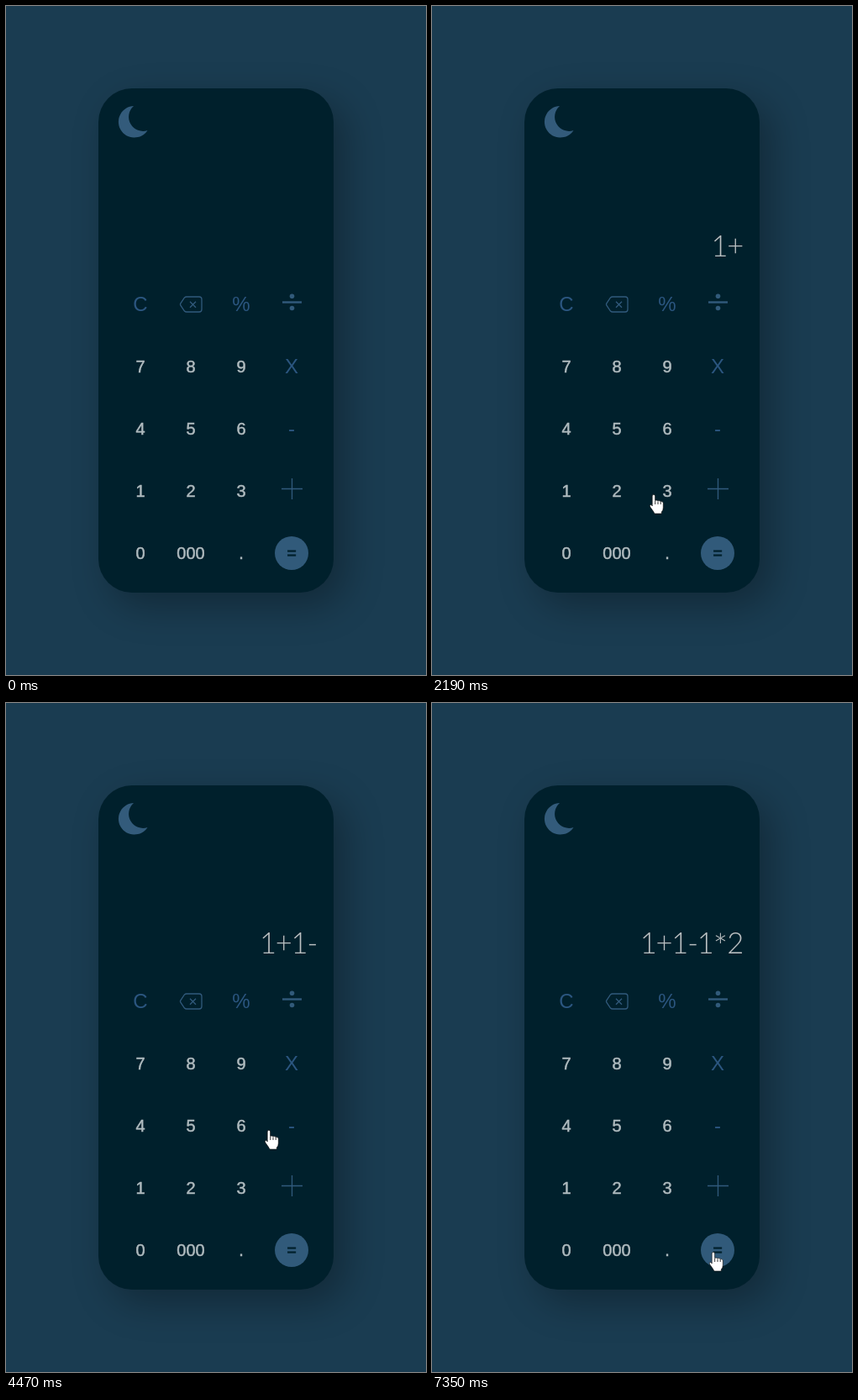
These frames come from a looping animation (500 by 796 pixels, 8000 ms). An HTML page:

```html
<!DOCTYPE html>
<html lang="en">
<head>
<meta charset="utf-8">
<title>Calculator</title>
<style>
  html, body { margin: 0; width: 100%; height: 100%; overflow: hidden; background: #1a3c51; }
  .case {
    position: absolute; left: 110px; top: 98px; width: 280px; height: 600px;
    border-radius: 40px; background: #00202c;
    box-shadow: 14px 16px 45px rgba(0, 0, 0, .3);
  }
  svg { position: absolute; left: 0; top: 0; }
  #display {
    position: absolute; left: 110px; width: 260px; top: 265px; letter-spacing: -1.2px;
    font: 300 34.5px/40px Lato, sans-serif; text-align: right; white-space: nowrap; color: #bcc0c2;
  }
  #display i { font-style: normal; font-size: 42px; line-height: 0; vertical-align: -7px; }
  text {
    font: 20px "Liberation Sans", Arial, sans-serif; text-anchor: middle;
    fill: #b0bbbf; stroke: #b0bbbf; stroke-width: .5;
  }
  .op { font-size: 24px; fill: #2b5680; stroke: none; }
  .equals { fill: #00202c; stroke: #00202c; }
  .line { fill: none; stroke: #315a7c; }
</style>
</head>
<body>
<div class="case"></div>
<div id="display"></div>
<svg width="500" height="796" viewBox="0 0 500 796">
  <path fill="#335b7b" d="M152 119A18.8 18.8 0 1 0 168.5 148A17 17 0 0 1 152 119Z"/>
  <g id="keys"></g>
  <g class="line" stroke-width="1.3">
    <path d="M215 346H230a3 3 0 0 1 3 3V361a3 3 0 0 1-3 3H215q-1.500 0-2.500-1L208 356.500q-1.200-1.500 0-3L212.500 347q1-1 2.500-1Z"/>
    <path d="M219 351.700l7 7m0-7l-7 7"/>
    <path d="M328 574.500h25M340.500 562v25"/>
    <path stroke-width="2.400" d="M329 352.500h23"/>
  </g>
  <g fill="#315a7a">
    <circle cx="340.500" cy="345.300" r="2.800"/>
    <circle cx="340.500" cy="359.500" r="2.800"/>
    <circle cx="340" cy="651" r="20"/>
  </g>
  <text class="equals" x="340" y="658">=</text>
  <g id="cursor">
    <circle id="press" cy="-.5" r="12" fill="#fff500" fill-opacity=".5"/>
    <g fill="#fff" stroke="#000" stroke-width=".6">
      <path id="arrow" d="M0 0V16L4 12.500 6.500 18.500 9 17.500 6.500 11.800H11.500Z"/>
      <g id="hand">
        <path d="M-1.800 14V2a1.700 1.700 0 0 1 3.400 0V7.500q1.700-1 3.400.3 1.800-.6 3.200.8 2-.4 3.100 1.400V16q0 3-2 5V23H1q-1.500-3-5.300-8-1.200-2 .5-2.600 1.200-.3 2 1.600Z"/>
        <path stroke-width=".8" d="M1.700 8v4M5 8.500v3.500M8.200 9v3"/>
      </g>
    </g>
  </g>
</svg>
<script>
const $ = id => document.getElementById(id);
const LOOP = 8000, ENTER = 200, PRESS_TIME = 70, ROW = 74;

// Key labels by row; "_" cells hold drawn icons.
$("keys").innerHTML = ["C _ % _", "7 8 9 X", "4 5 6 -", "1 2 3 _", "0 000 . _"].map((row, r) =>
  row.split(" ").map((label, c) => {
    const op = r === 0 || c === 3;
    return label === "_" ? "" :
      `<text x="${160 + 60 * c}" y="${(op ? 363 : 362) + ROW * r}" class="${op ? "op" : ""}">${label}</text>`;
  }).join("")).join("");

// Each stop: when the pointer sets off and arrives, then what it presses there.
const START = { x: 395, y: 785 };
const STOPS = [
  { x: 161, y: 569, leave: ENTER, arrive: 970, press: 1040, char: "1" },
  { x: 340, y: 582, leave: 1340, arrive: 1730, press: 1790, char: "+" },
  { x: 160, y: 577, leave: 2000, arrive: 3150, press: 3280, char: "1" },
  { x: 350, y: 501, leave: 3770, arrive: 4200, press: 4340, char: "-" },
  { x: 156, y: 573, leave: 4450, arrive: 4760, press: 5100, char: "1" },
  { x: 345, y: 432, leave: 5180, arrive: 5405, press: 5720, char: "*" },
  { x: 226, y: 569, leave: 5850, arrive: 6450, press: 6540, char: "2" },
  { x: 329, y: 643, leave: 6610, arrive: 7020 },
  { x: 335, y: 653, leave: 7150, arrive: 7350 }
];
const PRESSES = STOPS.filter(s => s.char);

const easeOut = (u, power) => 1 - (1 - u) ** power;

// Sideways motion settles sooner than vertical, which bends the path.
function pointerAt(t) {
  const i = STOPS.findLastIndex(s => t >= s.leave);
  const to = STOPS[i], from = STOPS[i - 1] || START;
  const u = Math.min(1, (t - to.leave) / (to.arrive - to.leave));
  return [from.x + (to.x - from.x) * easeOut(u, 3), from.y + (to.y - from.y) * easeOut(u, 1.5)];
}

const overKey = (x, y) =>
  x > 130 && x < 370 && y > 334 && y < 672 && Math.abs((y - 354 + ROW / 2) % ROW - ROW / 2) <= 20;

const show = (id, on) => $(id).style.display = on ? "" : "none";

function draw(now) {
  const t = now % LOOP;
  const typed = PRESSES.filter(s => t >= s.press + PRESS_TIME).map(s => s.char).join("");
  $("display").innerHTML = typed.replace("*", "<i>*</i>");
  show("cursor", t >= ENTER);
  if (t >= ENTER) {
    const [x, y] = pointerAt(t), hand = overKey(x, y);
    $("cursor").setAttribute("transform", `translate(${Math.round(x)} ${Math.round(y)})`);
    show("hand", hand);
    show("arrow", !hand);
    show("press", PRESSES.some(s => t >= s.press && t < s.press + PRESS_TIME));
  }
  requestAnimationFrame(draw);
}
requestAnimationFrame(draw);
</script>
</body>
</html>
```
